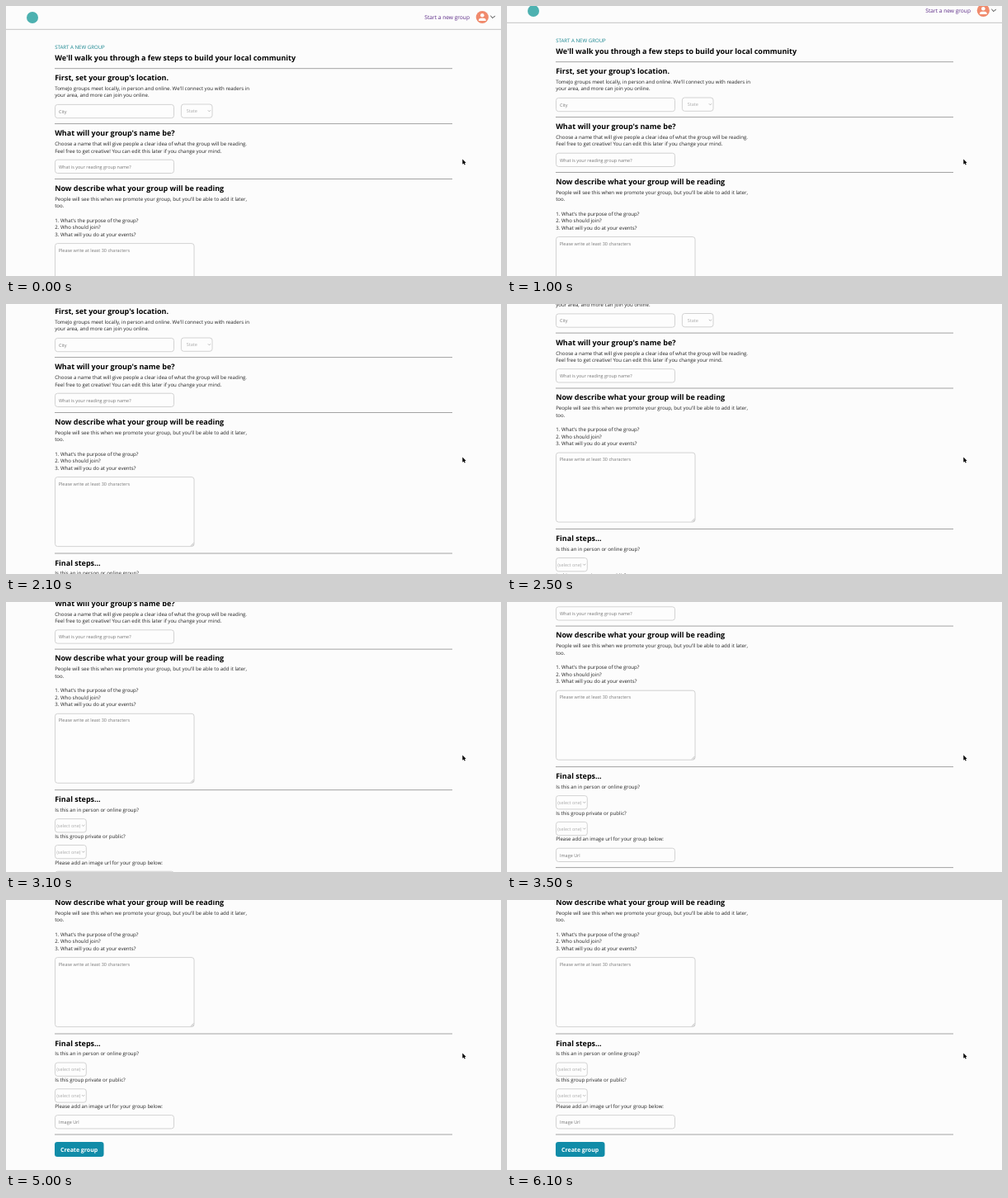
Animation of 600 by 327 pixels, one loop 6200 ms. Source, as an HTML page:

```html
<!DOCTYPE html>
<html lang="en">
<head>
<meta charset="utf-8">
<title>Start a new group</title>
<style>
  html, body { margin: 0; width: 100%; height: 100%; overflow: hidden; background: #fcfcfc; }
  svg { display: block; width: 100vw; height: 100vh; }
  text { font-family: "Open Sans", sans-serif; text-rendering: geometricPrecision; white-space: pre; }
  .body { font-size: 6.1px; fill: #222; }
  .eyebrow { font-size: 6.1px; fill: #16858f; }
  .heading { font-size: 8.97px; font-weight: 700; fill: #000; }
  .hint { font-size: 5.47px; fill: #777; }
  .choice { font-size: 5.5px; fill: #aaa; }
  .nav { font-size: 6.63px; fill: #5b2a86; }
  .button { font-size: 7px; font-weight: 700; fill: #fff; }
  .field { fill: #fdfdfd; stroke: #c8c8c8; stroke-width: .8; }
  .rule { stroke: #a3a3a3; stroke-width: 1; }
  .stroke { fill: none; stroke-linecap: round; stroke-linejoin: round; }
</style>
</head>
<body>
<svg viewBox="0 0 600 327">
  <g id="page"></g>
  <path d="M553.3 185.6v6.1l1.4-1.3 1 2.2 1.1-.5-1-2.1h1.9z" fill="#000" stroke="#fff" stroke-width=".5" paint-order="stroke"/>
</svg>
<script>
const LOOP = 6200, STEP = 100, LEFT = 59.2;
const page = document.getElementById('page');

const text = (cls, y, content, x = LEFT) => `<text class="${cls}" x="${x}" y="${y}">${content}</text>`;
const lines = (...rows) => rows.map(([y, content]) => text('body', y, content)).join('');
const rule = y => `<path class="rule" d="M59 ${y}H541"/>`;
const box = (x, y, w, h) => `<rect class="field" x="${x}" y="${y}" width="${w}" height="${h}" rx="3"/>`;
const chevron = (x, y, size, color, width) =>
  `<path class="stroke" d="M${x - size} ${y - size / 2}l${size} ${size} ${size} ${-size}" stroke="${color}" stroke-width="${width}"/>`;
const input = (y, hint) => box(59.5, y, 144, 16.3) + text('hint', y + 10.4, hint, 64);
const select = (x, y, w, label, inset) =>
  box(x, y, w, 16.3) + text('choice', y + 10.2, label, x + inset) + chevron(x + w - 3.6, y + 8.2, 1.3, '#aaa', .8);

const header = `
  <circle cx="32" cy="14" r="7" fill="#4db1b0"/>
  ${text('nav', 16, 'Start a new group', 507.3)}
  <circle cx="577.3" cy="13.5" r="7.6" fill="#f08a6c"/>
  <circle cx="577.3" cy="11.3" r="2.3" fill="#fff"/>
  <path d="M572.9 18v-.6q0-2.6 2.8-2.6h3.2q2.8 0 2.8 2.6v.6z" fill="#fff"/>
  ${chevron(590, 13.4, 2.4, '#333', 1)}
  <path d="M0 28.3H600" stroke="#c4c4c4"/>`;

const intro = text('eyebrow', 52.2, 'START A NEW GROUP')
  + text('heading', 66, "We'll walk you through a few steps to build your local community")
  + rule(75.7);

const place = text('heading', 90, "First, set your group's location.")
  + lines([101.9, "TomeJo groups meet locally, in person and online. We'll connect you with readers in"],
          [110.4, 'your area, and more can join you online.'])
  + input(119.4, 'City')
  + select(212.4, 119, 37.6, 'State', 6.4)
  + rule(142.6);

const naming = text('heading', 157, "What will your group's name be?")
  + lines([169, 'Choose a name that will give people a clear idea of what the group will be reading.'],
          [177.5, 'Feel free to get creative! You can edit this later if you change your mind.'])
  + input(186.2, 'What is your reading group name?')
  + rule(209.5);

const description = text('heading', 223.6, 'Now describe what your group will be reading')
  + lines([235.7, "People will see this when we promote your group, but you'll be able to add it later,"],
          [244.2, 'too.'],
          [261.6, "1. What's the purpose of the group?"],
          [270.2, '2. Who should join?'],
          [278.8, '3. What will you do at your events?'])
  + box(59.5, 287.6, 168.5, 84)
  + text('hint', 297.8, 'Please write at least 30 characters', 63.7)
  + '<path class="stroke" d="M224.2 370.6l3-3M226 370.6l1.2-1.2" stroke="#888" stroke-width=".5"/>'
  + rule(380);

const finish = text('heading', 394.6, 'Final steps...')
  + lines([406.1, 'Is this an in person or online group?'],
          [438, 'Is this group private or public?'],
          [469.9, 'Please add an image url for your group below:'])
  + select(59.5, 415, 37.8, '(select one)', 1.7)
  + select(59.5, 446.8, 37.8, '(select one)', 1.7)
  + input(478.6, 'Image Url')
  + rule(502)
  + '<rect x="59" y="511" width="59.5" height="18" rx="3.2" fill="#118ca8"/>'
  + text('button', 522.5, 'Create group', 66);

page.innerHTML = header + intro + place + naming + description + finish;

// Each scroll gesture: start and end time, distance, and how late it speeds up.
const gestures = [
  { start: 700, end: 1400, distance: 48.5, bias: 1.6 },
  { start: 1700, end: 2500, distance: 59, bias: 1 },
  { start: 2800, end: 3800, distance: 78.5, bias: .5 },
  { start: 3900, end: 4500, distance: 32, bias: 1.16 }
];

function scrollAt(time) {
  return gestures.reduce((sum, { start, end, distance, bias }) => {
    const u = Math.min(1, Math.max(0, (time - start) / (end - start))) ** bias;
    return sum + distance * u * u * (3 - 2 * u);
  }, 0);
}

function draw() {
  const time = Math.floor(performance.now() % LOOP / STEP) * STEP;
  page.setAttribute('transform', `translate(0 ${-scrollAt(time).toFixed(2)})`);
  requestAnimationFrame(draw);
}
draw();
</script>
</body>
</html>
```
